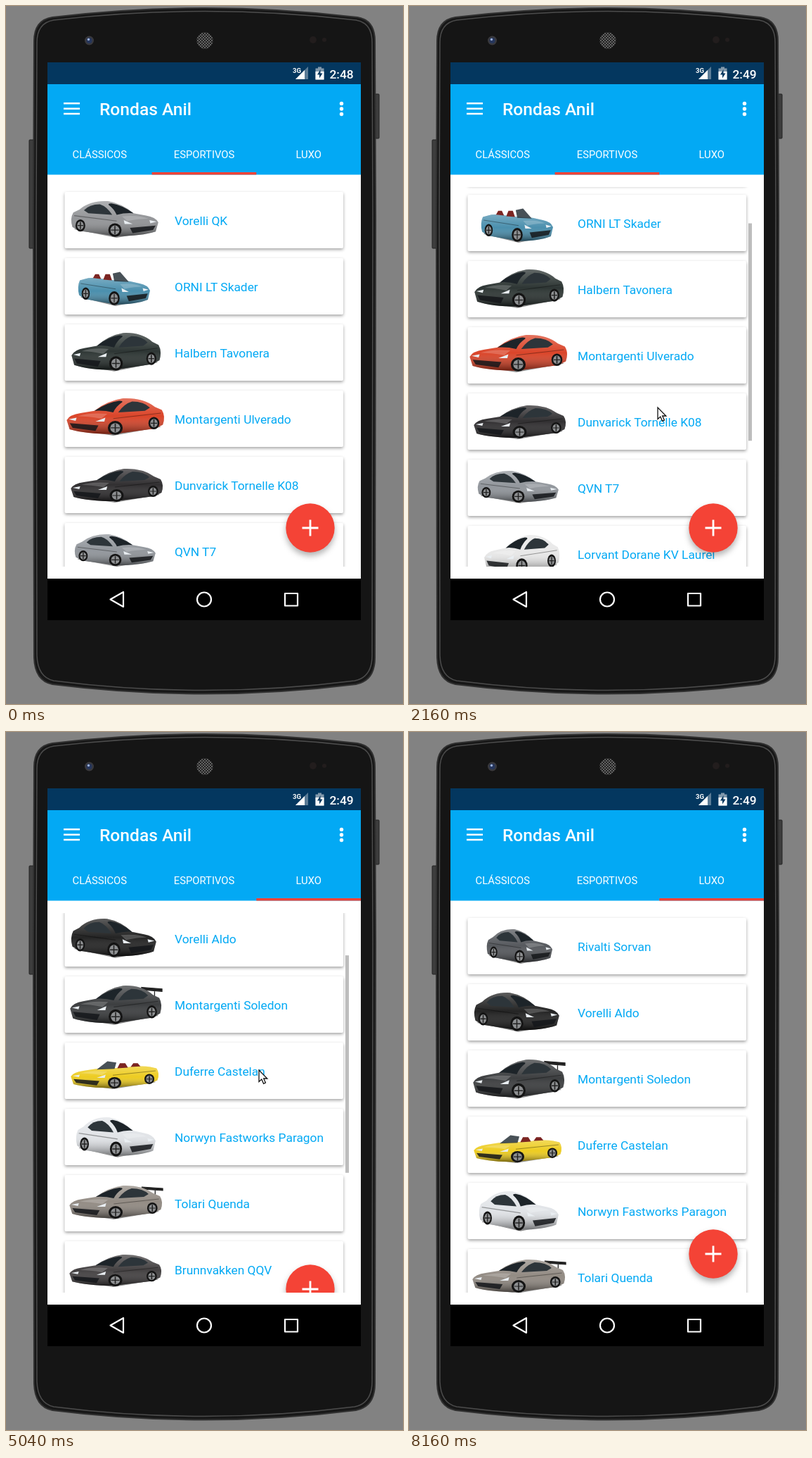
These frames come from a looping animation (565x991 px, 8880 ms). An HTML page:

```html
<!DOCTYPE html>
<html lang="pt">
<head>
<meta charset="utf-8">
<title>Rondas Anil</title>
<style>
  html, body { margin: 0; width: 100%; height: 100%; overflow: hidden; background: #828282; }
  svg { display: block; width: 100%; height: 100%; }
  text { font-family: Roboto, sans-serif; fill: #fff; }
  .name { font-size: 17.35px; fill: #03a9f4; }
  .tab { font-size: 14.8px; text-anchor: middle; }
  .card { fill: #fff; filter: drop-shadow(0 2px 2px rgba(0,0,0,.36)); }
  .fab { fill: #f44336; filter: drop-shadow(0 5px 4px rgba(0,0,0,.3)); }
</style>
</head>
<body>
<svg viewBox="0 0 565 991">
  <defs>
    <linearGradient id="shade" x1="0" y1="0" x2="0" y2="1">
      <stop offset="0" stop-color="#fff" stop-opacity=".3"/>
      <stop offset=".5" stop-color="#fff" stop-opacity=".06"/>
      <stop offset="1" stop-color="#000" stop-opacity=".5"/>
    </linearGradient>
    <pattern id="mesh" width="4" height="4" patternUnits="userSpaceOnUse">
      <rect width="4" height="4" fill="#222"/>
      <circle cx="1" cy="1" r="1" fill="#777"/><circle cx="3" cy="3" r="1" fill="#777"/>
    </pattern>
    <clipPath id="view"><rect x="76" y="257" width="412" height="539"/></clipPath>
  </defs>

  <rect width="565" height="991" fill="#828282"/>
  <rect x="33" y="190" width="7" height="154" rx="1" fill="#3d3d3d" stroke="#222"/>
  <rect x="525" y="125" width="6" height="63" rx="1" fill="#3d3d3d" stroke="#222"/>
  <path id="phone" fill="#171717" stroke="#303030" stroke-width="2"
    d="M40 50Q40 20 66 16Q282-10 500 16Q525 20 525 50L526 300L525 925Q525 958 498 963Q282 990 66 963Q41 958 40 925L39 300Z"/>
  <path fill="#151515" stroke="#4c4c4c" stroke-width="1.5"
    d="M44 52Q44 24 68 20Q282-5 498 20Q521 24 521 52L522 300L521 922Q521 953 496 958Q282 985 68 958Q45 953 44 922L43 300Z"/>
  <circle cx="118.500" cy="49" r="6.500" fill="#39393d"/>
  <circle cx="118.500" cy="49" r="4" fill="#26365c"/>
  <circle cx="117.500" cy="47.500" r="1.700" fill="#9cb0d8"/>
  <circle cx="283" cy="49" r="11.500" fill="url(#mesh)"/>
  <g fill="#221d1d"><circle cx="437" cy="48" r="5"/><circle cx="453" cy="48" r="3"/></g>

  <rect x="59" y="80" width="446" height="792" fill="#fff"/>
  <rect x="59" y="80" width="446" height="31" fill="#04375f"/>
  <rect x="59" y="111" width="446" height="128.500" fill="#03a9f4"/>
  <rect x="59" y="813" width="446" height="59"/>

  <text x="408" y="95" font-size="9.500" font-weight="700">3G</text>
  <path d="M412 104L430 86V104Z" fill="#fff" opacity=".35"/>
  <path d="M412 104L425 91V104Z" fill="#fff"/>
  <path d="M440.500 88.500H444V86.500H449V88.500H452.500V104.500H440.500Z" fill="#8299ac"/>
  <path d="M440.500 93H452.500V104.500H440.500Z" fill="#fff"/>
  <path d="M447.500 90L443 97.500H446V102.500L450.500 95.500H447.500Z" fill="#04375f"/>
  <text id="clock" x="460.500" y="102.500" font-size="17.350" font-weight="500"></text>

  <path d="M82 138.300H105M82 145.700H105M82 153.100H105" stroke="#fff" stroke-width="2.500"/>
  <text x="133" y="155" font-size="24.600" font-weight="500">Rondas Anil</text>
  <g fill="#fff"><circle cx="477.500" cy="138.500" r="2.700"/><circle cx="477.500" cy="146" r="2.700"/><circle cx="477.500" cy="153.500" r="2.700"/></g>
  <text class="tab" x="133.300" y="216">CLÁSSICOS</text>
  <text class="tab" x="282" y="216">ESPORTIVOS</text>
  <text class="tab" x="430.700" y="216">LUXO</text>
  <rect id="mark" y="236" width="148.700" height="3.500" fill="#f44336"/>

  <g clip-path="url(#view)">
    <g id="sport"></g>
    <g id="luxury"></g>
    <rect id="bar" x="483" width="5" height="308.700" fill="#000"/>
    <g id="fab">
      <circle class="fab" cx="433" cy="741" r="34.700"/>
      <path d="M421.500 741H444.500M433 729.500V752.500" stroke="#fff" stroke-width="2.800"/>
    </g>
    <path id="low" fill="#03a9f4" d="M76 0V-48Q282-112 488-48V0Z"/>
    <path id="high" fill="#03a9f4" d="M76 0V48Q282 112 488 48V0Z"/>
  </g>

  <g fill="none" stroke="#fff" stroke-width="2.200" stroke-linejoin="round">
    <path d="M148.500 842.500L167 832V853Z"/>
    <circle cx="282" cy="842.500" r="10"/>
    <rect x="397" y="834" width="18" height="17.500"/>
  </g>
  <path id="mouse" d="M0 0V16.500L3.800 13L6.600 19.300L9.400 18L6.700 12H11.800Z" fill="#fff" stroke="#111" stroke-width="1.300"/>
</svg>

<script>
const $ = id => document.getElementById(id);

// name, shape, colour, box within the card, 1 = front on the right
const sport = [
  ['Vorelli QK', 'coupe', '#8d8f92', 92, 12, 126, 54, 1],
  ['ORNI LT Skader', 'open', '#3f88a8', 102, 14, 104, 55, 1],
  ['Halbern Tavonera', 'coupe', '#202927', 92, 11, 129, 57, 0],
  ['Montargenti Ulverado', 'coupe', '#d8391c', 85, 10, 141, 55, 0],
  ['Dunvarick Tornelle K08', 'coupe', '#242224', 91, 16, 133, 50, 0],
  ['QVN T7', 'coupe', '#8b9096', 97, 15, 117, 48, 1],
  ['Lorvant Dorane KV Laurel', 'coupe', '#e6e6e6', 106, 12, 109, 57, 0],
  ['Collanti Ventosario Prime', 'coupe', '#b5b7ba', 95, 13, 122, 55, 0],
  ['DaVOREN KT7-38B', 'coupe', '#b9661a', 89, 12, 135, 52, 0],
  ['HALVERDA-RINK K47 TQV', 'coupe', '#a9b0b3', 106, 8, 108, 60, 0]
];
const luxury = [
  ['Rivalti Sorvan', 'coupe', '#4c4f54', 110, 15, 95, 51, 1],
  ['Vorelli Aldo', 'coupe', '#161616', 92, 11, 123, 58, 1],
  ['Montargenti Soledon', 'wing', '#303234', 90, 12, 132, 58, 0],
  ['Duferre Castelan', 'open', '#ecc913', 91, 22, 127, 45, 0],
  ['Norwyn Fastworks Paragon', 'coupe', '#dfe2e6', 99, 11, 115, 59, 1],
  ['Tolari Quenda', 'wing', '#8c847c', 89, 14, 134, 50, 0],
  ['Brunnvakken QQV', 'coupe', '#383536', 89, 18, 133, 48, 0],
  ['Halverda KTV DaVoren', 'open', '#96999b', 106, 9, 105, 60, 1],
  ['Wends Larke Sentinel', 'coupe', '#c6c8ca', 98, 17, 114, 49, 0],
  ['Ziven KTO', 'coupe', '#c9c7c5', 95, 12, 130, 58, 0]
];

const wheel = (x, y, rx, ry) => `<ellipse cx="${x}" cy="${y}" rx="${rx}" ry="${ry}" fill="#141414"/>
  <ellipse cx="${x}" cy="${y}" rx="${rx * .68}" ry="${ry * .68}" fill="#8d8f91"/>
  <path d="M${x} ${y - ry * .6}V${y + ry * .6}M${x - rx * .6} ${y}H${x + rx * .6}" stroke="#222" stroke-width="1.2"/>`;

// Three-quarter view in a 100 by 50 box, front on the left
function car(shape, colour, x, y, w, h, right) {
  const open = shape === 'open';
  const roof = open ? 'L34 17L60 15Q80 11 90 14' : 'Q42 4 58 1Q78 0 90 12';
  const body = `M1 29Q4 22 15 20L29 17${roof}L97 16Q101 24 98 35L90 40L48 47Q20 47 4 41Z`;
  const glass = open
    ? '<path d="M30 18L42 5L52 7L50 17Z" fill="#28323a" opacity=".85"/><path d="M53 16L56 8H62L65 15ZM68 14L71 8H76L79 13Z" fill="#7b2522"/>'
    : '<path d="M29 17Q42 6 54 4Q58 4 57 6Q51 11 48 19Q38 16 29 17Z" fill="#1d2429"/><path d="M53 19Q59 8 67 5Q79 5 85 13L80 17Z" fill="#2d353a"/>';
  const wing = shape === 'wing'
    ? '<path d="M78 3L100 5V8L78 6ZM92 7V15M82 6V11" fill="#222" stroke="#222"/>' : '';
  const place = right ? `translate(${x + w} ${y}) scale(${-w / 100} ${h / 50})`
                      : `translate(${x} ${y}) scale(${w / 100} ${h / 50})`;
  return `<g transform="${place}">
    <path d="M4 40L48 49L96 38L90 33Z" fill="#333" opacity=".55"/>${wing}
    <path d="${body}" fill="${colour}"/><path d="${body}" fill="url(#shade)"/>${glass}
    <path d="M12 24Q24 19 42 21L36 27Q22 24 12 24Z" fill="#fff" opacity=".2"/>
    <path d="M48 27L96 20" stroke="#000" opacity=".35"/>
    <path d="M4 33L33 36L30 43L7 39Z" fill="#15171a" opacity=".85"/>
    <path d="M3 28L11 26L10 30ZM30 31L40 26L39 31Z" fill="#e9eef2"/>
    ${wheel(50, 39, 7.5, 9)}${wheel(89, 33, 5.5, 8)}</g>`;
}

const fill = (id, list) => $(id).innerHTML = list.map(([name, ...look], i) =>
  `<g transform="translate(0 ${264 + i * 94})"><rect class="card" x="83.5" width="396.5" height="80" rx="2"/>
  ${car(...look)}<text class="name" x="240" y="47">${name}</text></g>`).join('');
fill('sport', sport);
fill('luxury', luxury);

// Linear value of a track of [time, value] keys
function at(keys, t, col = 1) {
  const i = keys.findIndex(k => k[0] > t);
  if (i < 0) return keys[keys.length - 1][col];
  if (!i) return keys[0][col];
  const a = keys[i - 1], b = keys[i];
  return a[col] + (b[col] - a[col]) * (t - a[0]) / (b[0] - a[0]);
}

const LOOP = 8880, STEP = 120, SWITCH = 4680;
const scroll = [[360, 0], [600, 170], [960, 300], [1320, 325], [1560, 287], [1920, 150], [2280, 60], [2520, 110],
  [2880, 380], [3000, 402], [3360, 402], [3480, 330], [3720, 50], [3840, 0], [4920, 0], [5160, 210], [5400, 380],
  [5520, 402], [6720, 402], [6960, 390.5], [7200, 150], [7440, 0]];
const hide = [[480, 0], [720, 100], [1440, 100], [1560, 44], [1680, 0], [2400, 0], [2640, 100], [3360, 100],
  [3600, 0], [4920, 0], [5160, 100], [6840, 100], [6960, 55], [7080, 0]];
const barAlpha = [[240, 0], [360, 1], [3840, 1], [4080, .15], [4320, 0], [4920, 0], [5040, 1], [7560, 1], [8160, 0]];
const lowGlow = [[2880, 0], [3000, 50], [3120, 80], [3480, 0], [5400, 0], [5520, 40], [5760, 20], [6000, 0],
  [6120, 0], [6360, 60], [6600, 0]];
const highGlow = [[3600, 0], [3840, 35], [4080, 7], [4200, 0], [7320, 0], [7440, 40], [7920, 0]];
const mouse = [[120, 395, 520], [480, 390, 470], [960, 370, 300], [1320, 362, 330], [1560, 360, 391],
  [1920, 356, 540], [2400, 352, 600], [2880, 353, 430], [3120, 354, 382], [3360, 352, 340], [3600, 350, 500],
  [3840, 400, 152], [3960, 405, 151], [4080, 414, 164], [4320, 431, 200], [4440, 431, 200], [4680, 431, 204],
  [4920, 380, 440], [5040, 360, 480], [5400, 330, 380], [5760, 316, 343], [6000, 312, 400], [6360, 300, 185],
  [6720, 304, 270], [6960, 306, 292], [7320, 310, 480], [8040, 312, 500]];

const move = (id, x, y, more = '') => $(id).setAttribute('transform', `translate(${x} ${y})${more}`);
function glow(id, y, height) {
  move(id, 0, y, ` scale(1 ${height / 80})`);
  $(id).setAttribute('opacity', height / 80 * .29);
}

function draw(now) {
  const t = Math.floor(now % LOOP / STEP) * STEP;
  const top = at(scroll, t), second = t >= SWITCH;
  $('sport').style.display = second ? 'none' : '';
  $('luxury').style.display = second ? '' : 'none';
  move(second ? 'luxury' : 'sport', 0, -top);
  move('bar', 0, 257 + top * .5728);
  $('bar').setAttribute('opacity', at(barAlpha, t) * .26);
  move('fab', 0, at(hide, t));
  glow('low', 796, at(lowGlow, t));
  glow('high', 257, at(highGlow, t));
  $('mark').setAttribute('x', at([[4560, 207.6], [4800, 356.3]], t));
  $('clock').textContent = t < 1800 ? '2:48' : '2:49';
  move('mouse', at(mouse, t), at(mouse, t, 2));
  $('mouse').style.display = t >= 120 && t < 8160 ? '' : 'none';
}

const start = performance.now();
function tick() {
  draw(performance.now() - start);
  requestAnimationFrame(tick);
}
tick();
</script>
</body>
</html>
```
